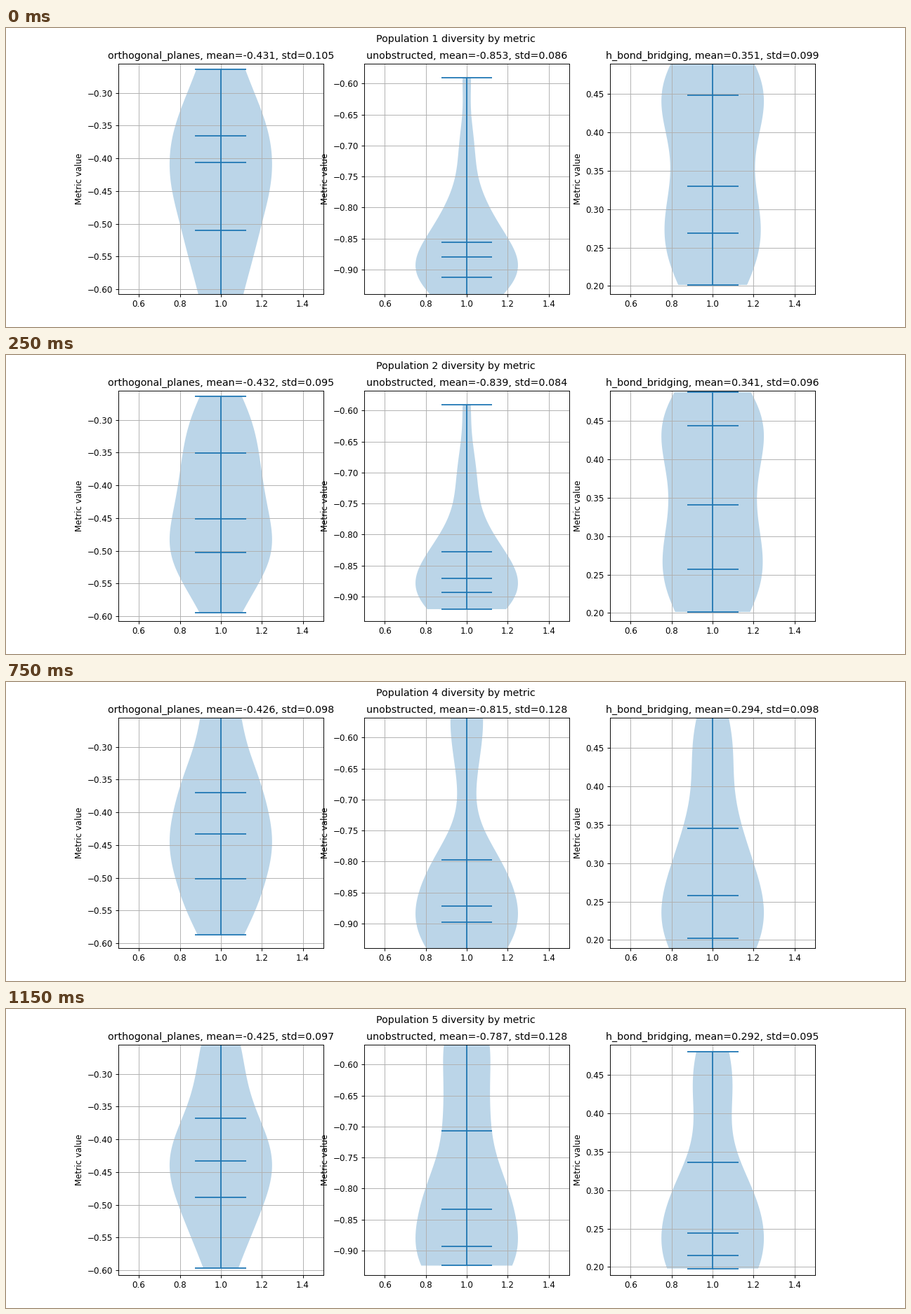
Recreate the animation shown at these times as a matplotlib script. Size 1280 by 427 pixels, loop 1250 ms.

```python
import numpy as np
import matplotlib.pyplot as plt
from matplotlib.animation import FuncAnimation

W, H = 1280, 427
DPI = W / 15
BLUE = "#1f77b4"

# Per population: mean, std, bar heights from high to low (extremes first and
# last), and relative half widths of the violin at evenly spaced knots.
PLANES = [
    (-0.431, 0.105, (-0.2642, -0.3652, -0.4063, -0.5100, -0.70),
     (30, 48, 65, 73, 69.5, 58.5, 46.5, 34, 23)),
    (-0.432, 0.095, (-0.2642, -0.3507, -0.4517, -0.5021, -0.5943),
     (24, 43, 54, 61, 69.5, 71.5, 53.5, 27.5, 8)),
    (-0.434, 0.081, (-0.2749, -0.3844, -0.4509, -0.4882, -0.5961),
     (15, 29, 43, 58, 72, 64, 38, 14, 3)),
    (-0.426, 0.098, (-0.20, -0.3697, -0.4335, -0.5011, -0.5868),
     (28.5, 39, 55, 68, 73, 65, 49, 27.5, 12)),
    (-0.425, 0.097, (-0.20, -0.3673, -0.4327, -0.4882, -0.5961),
     (27, 36, 49, 67, 73, 61, 42.5, 24, 10)),
]
OPEN = [
    (-0.853, 0.086, (-0.5906, -0.8563, -0.8797, -0.9124, -1.0),
     (3.5, 6, 6.5, 11, 16.5, 33, 59, 72.5, 44)),
    (-0.839, 0.084, (-0.5906, -0.8277, -0.8703, -0.8932, -0.9203),
     (4, 6, 8.5, 14, 20, 39, 66, 68, 31)),
    (-0.843, 0.105, (-0.5, -0.8373, -0.8845, -0.8951, -1.0),
     (2, 4, 9, 15, 21.5, 41, 65.5, 72, 48)),
    (-0.815, 0.128, (-0.5, -0.7976, -0.8721, -0.8981, -1.0),
     (22, 22, 16.5, 14, 25.5, 49, 68, 71.5, 52)),
    (-0.787, 0.128, (-0.5, -0.7064, -0.8334, -0.8932, -0.9243),
     (30, 33.5, 33, 35, 43.5, 58.5, 70, 71, 52)),
]
BRIDGING = [
    (0.351, 0.099, (0.55, 0.4475, 0.3293, 0.2687, 0.2014),
     (53, 72, 66.5, 60, 66, 66, 48, 24)),
    (0.341, 0.096, (0.4870, 0.4429, 0.3403, 0.2571, 0.2014),
     (46, 70.5, 69.5, 63, 68, 70, 52.5, 27)),
    (0.299, 0.084, (0.4452, 0.3581, 0.2650, 0.2347, 0.10),
     (18, 32, 36.5, 40, 58, 73, 56, 24)),
    (0.294, 0.098, (0.55, 0.3455, 0.2580, 0.2020, 0.10),
     (20, 28.5, 31, 41, 58, 71.5, 66, 41)),
    (0.292, 0.095, (0.4800, 0.3364, 0.2441, 0.2153, 0.1981),
     (18, 27.5, 27, 34.5, 56.5, 71.5, 65, 37)),
]

# name, y limits, first knot, populations
PANELS = [
    ("orthogonal_planes", (-0.6072, -0.2559), -0.25, PLANES),
    ("unobstructed", (-0.9396, -0.5683), -0.55, OPEN),
    ("h_bond_bridging", (0.1895, 0.4886), 0.50, BRIDGING),
]
STEP = 0.05


def bell(a, b):
    """Gaussian kernel between two sets of heights."""
    d = (np.asarray(a)[:, None] - np.asarray(b)[None, :]) / (1.2 * STEP)
    return np.exp(-d * d / 2)


def outline(first, widths, y):
    """Sum of Gaussians through the knots, with a peak of 0.25."""
    knots = first - STEP * np.arange(len(widths))
    weights = np.linalg.solve(bell(knots, knots), widths)
    half = bell(y, knots) @ weights
    return 0.25 * half / half.max()


def draw_panel(ax, panel, i):
    name, (lo, hi), first, pops = panel
    mean, std, bars, widths = pops[i]
    ax.clear()
    y = np.linspace(max(lo, bars[-1]), min(hi, bars[0]), 200)
    half = outline(first, widths, y)
    ax.fill_betweenx(y, 1 - half, 1 + half, facecolor=BLUE, alpha=0.3, linewidth=0)
    ax.hlines(bars, 0.875, 1.125, colors=BLUE)
    ax.vlines(1, bars[-1], bars[0], colors=BLUE)
    ax.set_xlim(0.5, 1.5)
    ax.set_ylim(lo, hi)
    ax.set_xticks([0.6, 0.8, 1.0, 1.2, 1.4])
    ax.grid(True)
    ax.set_ylabel("Metric value")
    ax.set_title(f"{name}, mean={mean:.3f}, std={std:.3f}")


# The tiny margin keeps rounding from dropping a pixel.
fig, axes = plt.subplots(1, 3, figsize=((W + 0.001) / DPI, (H + 0.001) / DPI), dpi=DPI)
heading = fig.suptitle("")


def draw(i):
    heading.set_text(f"Population {i + 1} diversity by metric")
    for ax, panel in zip(axes, PANELS):
        draw_panel(ax, panel, i)
    return []


anim = FuncAnimation(fig, draw, frames=5, interval=250, repeat=True,
                     repeat_delay=0, blit=False)
plt.show()
```
